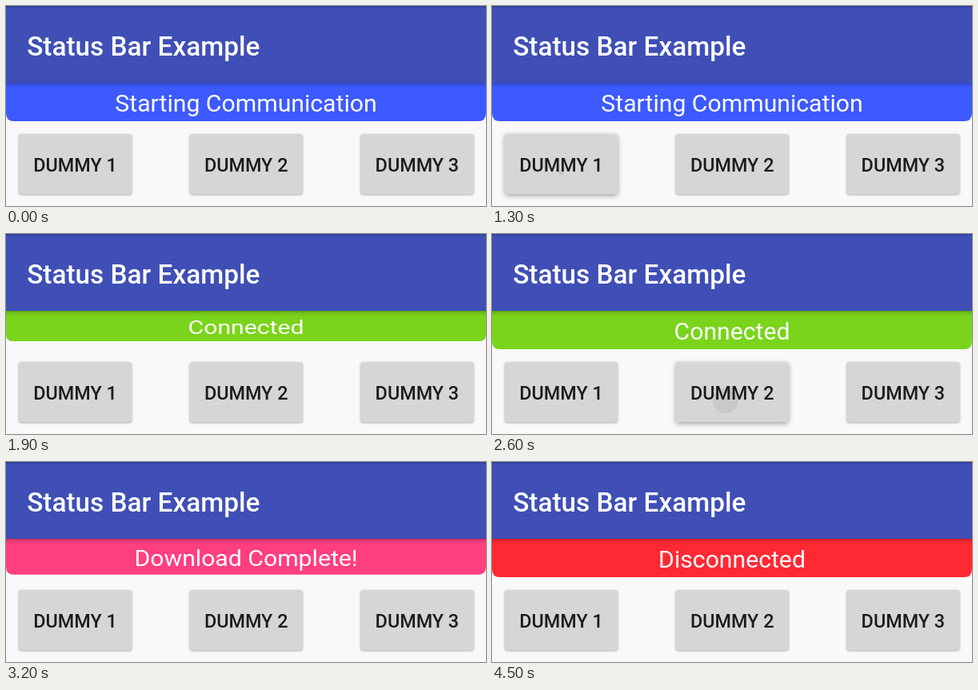
Write an HTML page that moves like this. It is 600 by 250 pixels and loops after 5100 ms.

```html
<!DOCTYPE html>
<html lang="en">
<head>
<meta charset="utf-8">
<title>Status Bar Example</title>
<style>
  html, body { margin: 0; width: 100%; height: 100%; overflow: hidden; background: #faf8fb; }
  svg { display: block; width: 600px; height: 250px; }
  text { font-family: Roboto, sans-serif; }
  .title { font-size: 33.3px; font-weight: 500; fill: #fff; }
  .message { font-size: 30.2px; fill: #fff; text-anchor: middle; }
  .label { font-size: 23.4px; font-weight: 500; fill: #1c1b1d; text-anchor: middle; }
  .face { fill: #d6d5d7; filter: drop-shadow(0 1px 1.5px rgba(0, 0, 0, .32)); }
  .raised .face { filter: drop-shadow(0 2px 3px rgba(0, 0, 0, .36)); }
</style>
</head>
<body>
<svg viewBox="0 0 600 250">
  <defs>
    <linearGradient id="shade" x2="0" y2="1">
      <stop offset="0" stop-opacity=".24"/>
      <stop offset=".4" stop-opacity=".09"/>
      <stop offset="1" stop-opacity="0"/>
    </linearGradient>
    <clipPath id="edge"><rect width="141" height="75" rx="3"/></clipPath>
  </defs>
  <rect width="600" height="250" fill="#faf8fb"/>
  <g id="buttons"></g>
  <g id="bar">
    <path id="fill" d="M0 0H600V38Q600 48 590 48H10Q0 48 0 38Z"/>
    <text id="message" class="message" x="300" y="36"></text>
  </g>
  <rect y="96" width="600" height="7" fill="url(#shade)"/>
  <rect width="600" height="96" fill="#3f4fb5"/>
  <rect width="600" height="2" fill="#303e9f"/>
  <text class="title" x="26.2" y="62">Status Bar Example</text>
</svg>
<script>
const LOOP = 5100, TICK = 100, LAST = 4500, FOLD = 300, PRESS_LEAD = 100;
const $ = id => document.getElementById(id);

// Each state begins folding the previous one away at `at`.
const states = [
  { at: -1000, text: 'Starting Communication', color: '#3d5afe' },
  { at: 1390, text: 'Connected', color: '#7ad41b' },
  { at: 2650, text: 'Download Complete!', color: '#ff3f80' },
  { at: 3850, text: 'Disconnected', color: '#ff2934' }
];

const touches = [[70, 48], [62, 48], [57, 48]];
const buttons = touches.map(([cx, cy], i) => {
  const g = document.createElementNS('http://www.w3.org/2000/svg', 'g');
  g.setAttribute('transform', `translate(${16 + i * 213.7} 160)`);
  g.innerHTML = `<rect class="face" width="141" height="75" rx="3"/>
    <g clip-path="url(#edge)"><circle cx="${cx}" cy="${cy}" r="0"/></g>
    <text class="label" x="70.5" y="46.5">DUMMY ${i + 1}</text>`;
  $('buttons').append(g);
  return { g, ripple: g.querySelector('circle'), press: states[i + 1].at - PRESS_LEAD };
});

const clamp = x => Math.min(1, Math.max(0, x));
const ease = x => (1 - Math.cos(Math.PI * clamp(x))) / 2;

function drawBar(t) {
  let i = states.length - 1;
  while (t < states[i].at) i--;
  const age = t - states[i].at;
  const closing = age < FOLD;
  const { text, color } = states[closing ? i - 1 : i];
  const scale = closing ? 1 - ease(age / FOLD) : ease(age / FOLD - 1);
  $('message').textContent = text;
  $('fill').setAttribute('fill', color);
  $('bar').setAttribute('transform', `translate(0 96) scale(1 ${scale})`);
}

function drawButton({ g, ripple, press }, t) {
  const age = t - press;
  g.classList.toggle('raised', age > 0 && age < 350);
  ripple.setAttribute('r', Math.max(0, age * 0.32));
  ripple.setAttribute('opacity', 0.065 * clamp((400 - age) / 150));
}

function draw(now) {
  const t = Math.min(LAST, Math.floor(now % LOOP / TICK) * TICK);
  drawBar(t);
  buttons.forEach(b => drawButton(b, t));
}

const start = performance.now();
(function frame() {
  draw(performance.now() - start);
  requestAnimationFrame(frame);
})();
</script>
</body>
</html>
```
